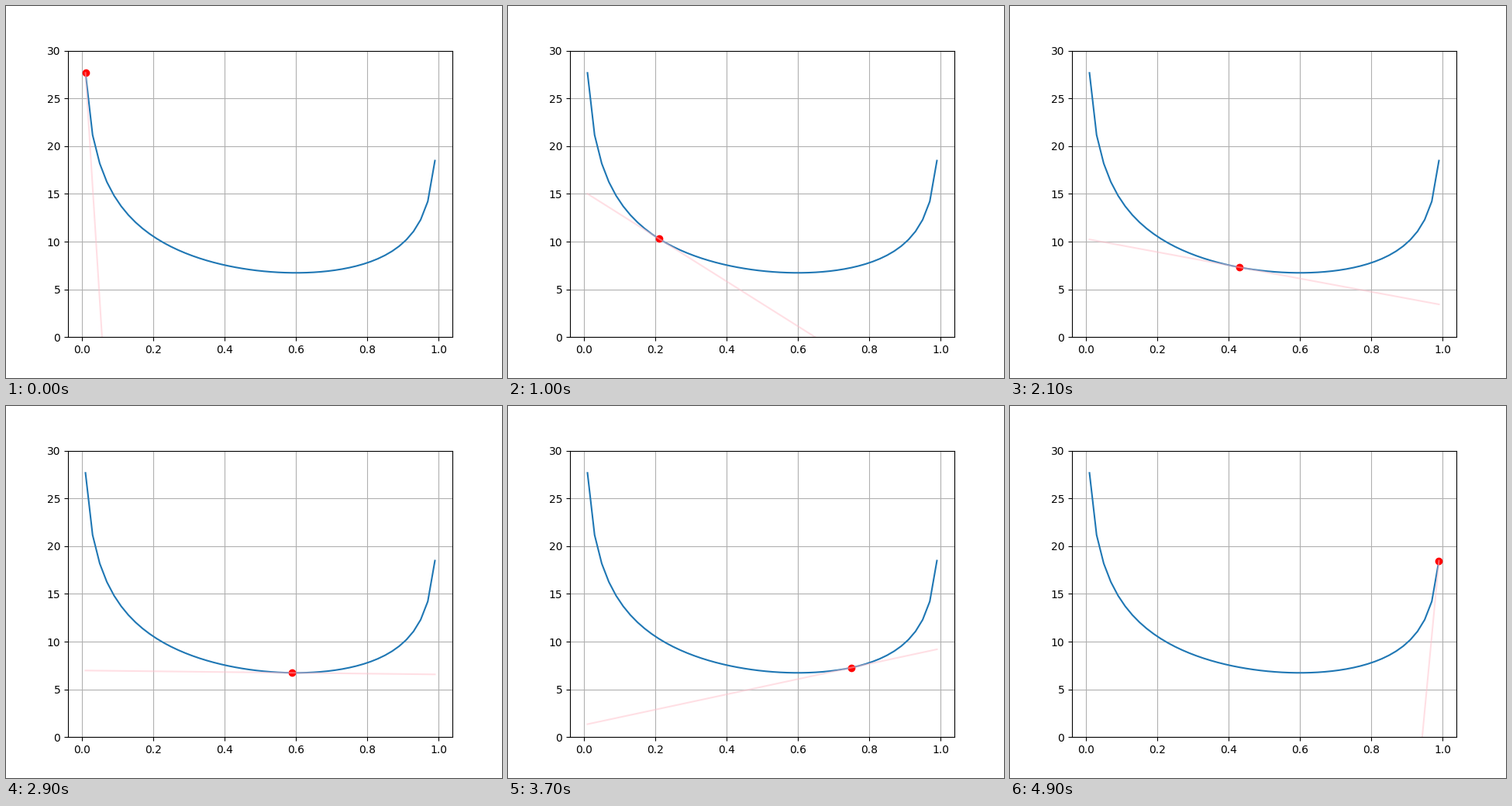
A matplotlib script that plays this animation: 640x480 px, repeating every 5 s.

```python
import numpy as np
import matplotlib.pyplot as plt
from matplotlib.animation import FuncAnimation

A, B = 6, 4  # log-loss weights; the minimum lies at A / (A + B)


def loss(x):
    return -A * np.log(x) - B * np.log(1 - x)


def slope(x):
    return -A / x + B / (1 - x)


xs = 0.01 + 0.02 * np.arange(50)

fig, ax = plt.subplots(figsize=(6.4, 4.8), dpi=100)
ax.plot(xs, loss(xs))
dot, = ax.plot([], [], "ro")
tangent, = ax.plot([], [], color="pink", alpha=0.5)
ax.set_xlim(-0.039, 1.039)
ax.set_ylim(0, 30)
ax.grid(True)


def update(i):
    x = xs[i]
    dot.set_data([x], [loss(x)])
    tangent.set_data(xs, loss(x) + slope(x) * (xs - x))
    return dot, tangent


anim = FuncAnimation(fig, update, frames=len(xs), interval=100, repeat=True)
plt.show()
```
